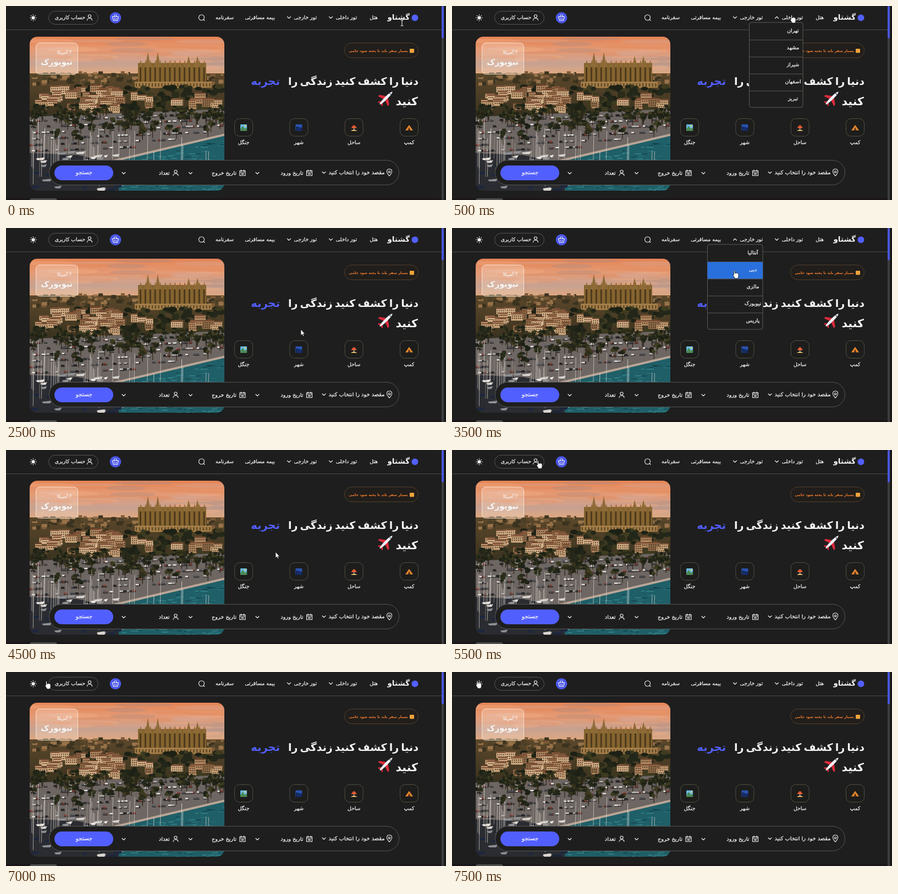
An HTML page with a canvas that plays this animation: 800 by 354 pixels, repeating every 8 s.

```html
<!DOCTYPE html>
<html lang="fa">
<head>
<meta charset="utf-8">
<title>Travel site tour</title>
<style>
  html, body { margin: 0; width: 100%; height: 100%; overflow: hidden; background: #1e1e1e; }
  #stage { position: relative; width: 800px; height: 354px; overflow: hidden; background: #1e1e1e; }
  .page, svg { position: absolute; left: 0; top: 0; width: 800px; height: 354px; }
  canvas { position: absolute; }
  text { font-family: "DejaVu Sans", sans-serif; direction: rtl; }
  .line { fill: none; stroke: #f2f2f2; stroke-width: 1.1; stroke-linecap: round; stroke-linejoin: round; }
</style>
</head>
<body>
<div id="stage">
  <div class="page" id="home"><canvas id="city"></canvas><svg id="homeArt"></svg></div>
  <div class="page" id="login"><canvas id="shore"></canvas><svg id="loginArt"></svg></div>
  <svg id="top"></svg>
</div>
<script>
const $ = id => document.getElementById(id);
const BG = '#1e1e1e', BLUE = '#525fff', WIRE = '#555';
const bold = { bold: 1 }, mid = { mid: 1 };
const repeat = (n, f) => { for (let i = 0; i < n; i++) f(i); };

// ---- SVG helpers ----
function text(x, y, s, size = 9.3, { fill = '#f6f6f6', bold, mid, gap = 0 } = {}) {
  const weight = bold ? 'font-weight="700"' : `stroke="${fill}" stroke-width=".25"`;
  return `<text x="${x}" y="${y}" font-size="${size}" fill="${fill}" ${weight} word-spacing="${gap}"` +
    ` text-anchor="${mid ? 'middle' : 'start'}">${s}</text>`;
}
const box = (x, y, w, h, r = 0, fill = 'none', stroke = 'none') =>
  `<rect x="${x}" y="${y}" width="${w}" height="${h}" rx="${r}" fill="${fill}" stroke="${stroke}"/>`;
const dot = (x, y, r, fill) => `<circle cx="${x}" cy="${y}" r="${r}" fill="${fill}"/>`;
const ring = r => `<circle class="line" r="${r}"/>`;
const shape = (d, fill) => `<path d="${d}" fill="${fill}"/>`;
const line = d => `<path class="line" d="${d}"/>`;
const at = (x, y, body, extra = '') => `<g transform="translate(${x} ${y}) ${extra}">${body}</g>`;

const chevron = (x, y, up) => at(x, y, line('M-3-1.5L0 1.5L3-1.5'), up ? 'scale(1 -1)' : '');
const person = at(0, -2.4, ring(2.6)) + line('M-4.5 5C-4.5 0 4.5 0 4.5 5');
const calendar = line('M-5-4H5V5H-5ZM-5-1.2H5M-2.5-5.5V-3M2.5-5.5V-3') + box(-2.5, .8, 5, 2.2, 0, '#ddd');
const pin = line('M0 6C-7-1-5-6.5 0-6.5S7-1 0 6Z') + at(0, -1.3, ring(1.7));
const lens = ring(5) + line('M3.6 3.6L5.5 5.5');
const basket = line('M-5.5-2H5.5L3.5 5H-3.5ZM-3-2L-1-5.5M3-2L1-5.5M-1.4 1V3M1.4 1V3');
const sun = dot(0, 0, 3, '#fff') +
  [...Array(8)].map((_, i) => `<g transform="rotate(${i * 45})">${line('M4.6 0H5.7')}</g>`).join('');

const wing = shape('M0-5L14 5V9L0 4ZM0 10L6 15V18L0 15Z', '#d92b3c');
const plane = wing + `<g transform="scale(-1 1)">${wing}</g>` +
  '<ellipse rx="2.9" ry="18" fill="#eef0f4"/>' + box(-1.7, -13, 3.4, 2, 1, '#50627a');

const tent = shape('M-7 5L0-5L7 5Z', '#e88a2c') + shape('M-2.5 5L0-1L2.5 5Z', '#5b2f1c');
const beach = shape('M-6 6Q0 1 6 6Z', '#e9c06a') + shape('M-5 1Q0-10 5 1Z', '#e2562f') + box(-.5, 0, 1, 5, 0, '#ddd');
const town = box(-6, -6, 12, 12, 1, '#2a52ae') + [0, 1, 2].map(i => box(i * 4 - 5, i - 2, 3, 8 - i, 0, '#10204f')).join('');
const park = box(-6, -6, 12, 12, 1, '#69b9e0') + shape('M-6 3L-2-3L2 2L6 0V6H-6Z', '#4a8a54') + dot(3, -3, 1.4, '#f5d75f');

// ---- Pages ----
const menus = [
  { x: 540.5, w: 97.5, title: 'تور داخلی', items: ['تهران', 'مشهد', 'شیراز', 'اصفهان', 'تبریز'] },
  { x: 464.5, w: 100.5, title: 'تور خارجی', items: ['آنتالیا', 'دبی', 'مالزی', 'نیویورک', 'پاریس'] }
];
const edge = box(0, 351, 797, 3, 0, '#1a151a') + box(797, 0, 3, 354, 0, '#181818');

function drawHome() {
  let s = edge + box(0, 43, 792, 1, 0, '#4b4b4b') + box(43, 351, 50, 8, 4, '#505050');
  s += box(792, 0, 4, 354, 0, '#3d3d3d') + box(792, 0, 4, 59, 2, '#4a55dc');

  // Header
  s += dot(743.5, 21.5, 6, BLUE) + text(734, 25, 'گشتاو', 13.5, bold);
  s += text(676, 24, 'هتل') + text(489, 24, 'بیمه مسافرتی') + text(414, 24, 'سفرنامه');
  menus.forEach(m => s += text(m.x + m.w, 24, m.title));
  s += at(355.5, 21, lens) + dot(199, 21.5, 10.3, '#4b57e8') + at(199, 21.5, basket);
  s += box(77.5, 9.5, 90, 24, 12, 'none', WIRE) + text(144, 24.3, 'حساب کاربری') + at(152, 21, person);
  s += at(49.5, 21.5, sun);

  // Photo label
  s += box(54.5, 67.5, 76, 57, 7, 'rgba(255,235,220,.27)', 'rgba(255,245,235,.75)');
  s += text(112, 87, 'آمریکا', 7.6) + at(117, 83.5, pin, 'scale(.5)') + text(121, 107, 'نیویورک', 14.4, bold);

  // Headline
  s += box(615.5, 67.5, 134, 27, 13.5, '#211e1b', '#51402f') + box(734, 78, 8, 7.5, 1, '#f0a23c');
  s += text(731, 83.5, 'بسیار سفر باید تا پخته شود خامی', 6.5, { bold: 1, fill: '#f07c30' });
  s += text(750, 143.5, 'دنیا را کشف کنید زندگی را', 19, { bold: 1, gap: -2.5 });
  s += text(498, 143.5, 'تجربه', 19.5, { bold: 1, fill: BLUE });
  s += text(749, 181, 'کنید', 20.5, bold) + at(691, 168, plane, 'rotate(45) scale(.9)');

  [['کمپ', tent], ['ساحل', beach], ['شهر', town], ['جنگل', park]].forEach(([name, icon], i) => {
    const x = 733 - i * 100.3;
    s += box(x - 16.5, 205.5, 33, 32, 9, '#1d1d1c', '#504e42') + at(x, 222, icon) + text(x, 252, name, 9.3, mid);
  });

  // Search bar
  s += box(78.5, 281.5, 636, 45, 22.5, BG, WIRE) + box(88, 291, 107, 27, 13.5, BLUE);
  s += text(142, 307, 'جستجو', 10.2, mid);
  s += at(697, 304, pin) + text(688.5, 307, 'مقصد خود را انتخاب کنید', 9.8) + chevron(578, 304);
  [['تاریخ ورود', calendar], ['تاریخ خروج', calendar], ['تعداد', person]].forEach(([name, icon], i) => {
    const x = 551.5 - i * 121.5;
    s += at(x, 304.5, icon) + text(x - 11, 308, name, 9.8) + chevron(x - 94.5, 305);
  });
  $('homeArt').innerHTML = s;
}

function drawLogin() {
  const link = { fill: '#2c2ce0' }, faint = { fill: '#77706a' };
  const pill = (y, fill = 'none') => box(466.5, y + .5, 248, 25.5, 13, fill, '#4a4a4a');
  let s = edge + text(715, 57, 'خوش آمدید', 17, bold);
  s += pill(82) + text(705, 98, 'نام کاربری', 8.3, faint);
  s += pill(122) + text(705, 138, 'رمز عبور', 8.1, faint);
  s += at(480, 135, line('M-4 0Q0-5 4 0Q0 5-4 0ZM-3.5-3.5L3.5 3.5') + dot(0, 0, 1.5, '#eee'));
  s += text(715, 173, 'رمز عبور خود را فراموش کرده اید؟', 7.5, bold) + text(588, 173, 'بازیابی رمز عبور', 7.8, link);
  s += pill(193, '#4b4b4b') + text(591, 209, 'ارسال', 8.2, { ...bold, ...mid });
  s += box(466, 240.5, 92, 1, 0, '#454545') + box(623, 240.5, 92, 1, 0, '#454545');
  s += text(591, 244, 'وارد شدن با', 8.3, { mid: 1, fill: '#626262' });
  s += pill(263) + dot(573.5, 275, 4.6, '#4285f4');
  s += `<text x="582.5" y="278.2" font-size="9" font-weight="700" fill="#fff"
    style="font-family:Roboto,sans-serif;direction:ltr">Quvola</text>`;
  s += text(644, 312, 'حساب کاربری ندارید؟', 7.7, bold) + text(562, 312, 'ثبت نام', 8, link);
  $('loginArt').innerHTML = s;
}

// ---- Photos as flat shapes ----
function painter(id, x, y, w, h, r, seed) {
  const cv = $(id), c = cv.getContext('2d');
  cv.width = w; cv.height = h;
  cv.style.cssText = `left:${x}px;top:${y}px;border-radius:${r}px`;
  c.translate(-x, -y);
  const rnd = (a, b) => a + (b - a) * (seed = seed * 16807 % 2147483647) / 2147483647;
  const pick = list => list[Math.floor(rnd(0, list.length))];
  const rect = (fill, a, b, p, q) => { c.fillStyle = fill; c.fillRect(a, b, p, q); };
  const blob = (fill, a, b, p, q) => { c.fillStyle = fill; c.beginPath(); c.ellipse(a, b, p, q, 0, 0, 7); c.fill(); };
  const poly = (fill, ...pts) => {
    c.fillStyle = fill; c.beginPath();
    for (let i = 0; i < pts.length; i += 2) c.lineTo(pts[i], pts[i + 1]);
    c.fill();
  };
  const stroke = (col, lw, a, b, p, q) => {
    c.strokeStyle = col; c.lineWidth = lw; c.beginPath(); c.moveTo(a, b); c.lineTo(p, q); c.stroke();
  };
  // Vertical gradient band over the full width
  const band = (y0, y1, ...cols) => {
    const g = c.createLinearGradient(0, y0, 0, y1);
    cols.forEach((k, i) => g.addColorStop(i / (cols.length - 1), k));
    rect(g, x, y0, w, y1 - y0);
  };
  const haze = (n, cols, y0, y1) => {
    c.globalAlpha = .35;
    repeat(n, () => blob(pick(cols), rnd(x, x + w), rnd(y0, y1), rnd(20, 60), rnd(1.5, 5)));
    c.globalAlpha = 1;
  };
  // Ragged hill rising to one peak
  const ridge = (fill, x0, x1, base, peak, top, rough = 4) => {
    const pts = [x0, base];
    for (let a = x0 + 4; a < x1; a += 4) {
      const u = a < peak ? (a - x0) / (peak - x0) : (x1 - a) / (x1 - peak);
      pts.push(a, base - (base - top) * u + rnd(-rough, rough));
    }
    poly(fill, ...pts, x1, base);
  };
  return { rnd, pick, rect, blob, poly, stroke, band, haze, ridge };
}

function drawCity() {
  const { rnd, pick, rect, blob, poly, stroke, band, haze } = painter('city', 43, 56, 354, 281, 14, 71);
  const leaf = ['#1d2115', '#2b2d1a', '#3d3b20', '#23271a'];
  band(56, 130, '#e58455', '#e49a74', '#c7a190', '#e6aa7b');
  haze(30, ['#f4ae84', '#a98a82', '#e2865a', '#d3a795'], 58, 112);

  // Old town
  band(123, 200, '#5c482b', '#3a321f');
  repeat(130, () => rect(pick(['#7d5b38', '#3b331f', '#98734a', '#4d4027']), rnd(43, 392), rnd(119, 140), rnd(3, 12), rnd(3, 8)));

  // Cathedral
  const spire = (x, top, w) => poly('#8d6a36', x - w, 112, x, top, x + w, 112);
  rect('#86642f', 240, 104, 124, 46);
  repeat(14, i => {
    spire(245 + i * 8.9, 98, 3);
    rect('#4d3a1d', 243 + i * 8.9, 112, 3, 26);
  });
  [258, 276, 332, 348].forEach((x, i) => spire(x, i < 2 ? 84 : 91, 5));
  rect('#a37d49', 234, 138, 140, 11);
  repeat(24, i => rect('#59421f', 236 + i * 5.8, 141, 2, 6));

  // Trees, then house fronts stepping down the slope
  repeat(120, () => blob(pick(leaf), rnd(130, 397), rnd(147, 190), rnd(4, 9), rnd(3, 6)));
  repeat(60, i => {
    const left = i < 44, x = left ? rnd(43, 205) : rnd(225, 385), y = left ? 143 + i * .9 : rnd(156, 172);
    const w = rnd(10, 22), h = rnd(9, 18);
    rect(pick(['#b08660', '#cba57c', '#8f6a48', '#d9b48c']), x, y, w, h);
    rect('#70442c', x, y, w, 2);
    for (let a = x + 2; a < x + w - 1; a += 3.5)
      for (let b = y + 4; b < y + h - 2; b += 4) rect('#453422', a, b, 1.6, 2.2);
  });

  // Car park in rows, with palms between
  poly('#6d6662', 43, 202, 397, 188, 397, 236, 205, 280, 43, 290);
  repeat(230, i => {
    const x = rnd(43, 390), y = 208 + (i % 6) * 11 - (x - 43) * .04;
    if (y > 262 - (x - 200) * .2) return;
    rect('#35302e', x, y + 2, 7, 2);
    rect(pick(['#e4e2df', '#202124', '#4d5056', '#b5b2b0', '#7c3a30']), x, y, rnd(4, 7), 2.6);
  });
  repeat(110, i => {
    const x = rnd(43, 397), y = i < 70 ? rnd(183, 204) : rnd(200, 246 - (x - 43) * .06);
    stroke('#33281d', 1.3, x, y, x, y + 15);
    repeat(6, () => blob(pick(leaf), x + rnd(-5, 5), y + rnd(-4, 4), rnd(2, 4.5), rnd(1.5, 3.5)));
  });

  // Harbour
  poly('#1f5f68', 397, 236, 397, 337, 43, 337, 43, 290, 205, 282);
  repeat(160, () => {
    const x = rnd(205, 397);
    rect(pick(['#3b8a90', '#123f49', '#2b767d']), x, rnd(290 - (x - 195) * .24, 337), rnd(4, 14), 1.3);
  });
  stroke('#b9a596', 4, 190, 284, 397, 235);
  poly('#2a2c31', 43, 268, 130, 272, 205, 288, 205, 337, 43, 337);
  repeat(60, () => {
    const x = rnd(43, 205), y = rnd(266, 335), w = rnd(8, 20);
    poly(pick(['#d8d4d0', '#8c8f94', '#1c2640', '#efe9e4']), x, y, x + w, y - 2, x + w - 3, y + 3, x + 3, y + 3);
  });
  repeat(44, i => {
    const x = i < 34 ? rnd(43, 205) : rnd(205, 395), y = rnd(275, 330);
    stroke(pick(['#d8d0c8', '#9c948c', '#f3eeea']), .7, x, y, x + 1, y - rnd(30, 75));
  });
}

function drawShore() {
  const { rnd, pick, rect, blob, poly, band, haze, ridge } = painter('shore', 19, 18, 381, 319, 20, 29);
  band(18, 160, '#227f89', '#4d8b91', '#a3a29c', '#d8b294', '#e5bd97');
  haze(34, ['#e2bda0', '#8b8684', '#c9a995', '#77898d'], 48, 105);
  blob('#cfa890', 48, 32, 32, 14);
  band(158, 337, '#778da3', '#b4bcc8', '#d2ced0', '#8fa9b5', '#3f7d88');
  haze(55, ['#e5dfdf', '#7e9bae', '#c9d0d9'], 163, 285);

  // Sea stacks with lit faces
  ridge('#6b5038', 38, 92, 160, 69, 99);
  ridge('#54432f', 38, 181, 160, 131, 64);
  ridge('#8b6b3f', 108, 152, 122, 131, 70);
  ridge('#a56c5a', 80, 124, 155, 102, 108);
  ridge('#372f2a', 118, 180, 160, 152, 122);
  ridge('#55463a', 247, 272, 160, 257, 137, 2);
  ridge('#55463a', 264, 300, 160, 279, 96, 2);
  ridge('#a0775a', 270, 286, 152, 278, 104, 2);

  // Rocks grow towards the viewer
  const rock = (x, y, w) => {
    ridge('#1f2327', x - w, x + w, y, x - w * .3, y - w * .8, w * .08);
    blob('#1f2327', x, y - w * .25, w * .9, w * .34);
    repeat(6, () => rect('#3b4349', x + rnd(-.5, .4) * w, y - rnd(.1, .5) * w, w * .2, 1.2));
  };
  [[145, 184, 32], [82, 211, 44], [145, 252, 34], [245, 200, 36], [270, 222, 37], [191, 234, 21], [372, 223, 22]]
    .forEach(r => rock(...r));
  repeat(9, i => {
    const y = 175 + i * 9;
    blob('#23282d', rnd(40, 395), y, y / 14, y / 70);
  });

  // Pebble beach
  poly('#16242a', 19, 248, 135, 264, 245, 284, 310, 304, 400, 313, 400, 337, 19, 337);
  repeat(900, () => {
    const x = rnd(19, 330);
    rect(pick(['#0f1416', '#2b3c44', '#295962', '#121b20']), x, rnd(252 + (x - 19) * .16, 337), rnd(1, 3.5), 1.4);
  });
  blob('#15191c', 360, 322, 55, 38);
  repeat(60, () => rect('#30383d', rnd(315, 395), rnd(292, 335), rnd(2, 6), 1));
}

// ---- Pointer and menus ----
const hand = 'M-3.5-5.5Q-2.5-7-1.5-5.5V-1.5Q5-3 5 1V3.5Q5 6 3.5 8H-1.5L-5.5 1.5L-3.5 1.2Z';
const arrow = 'M0-4V7L2.5 4.8L4.2 8.4L6 7.6L4.3 4.2H7.5Z';
const solid = d => `<path d="${d}" fill="#fff" stroke="#111" stroke-width=".8"/>`;
const beam = line('M-2-5H2M0-5V5M-2 5H2');

const ROW = 31, TOP = 30;
function menuArt(m, row) {
  const grey = '#5a5a55', center = m.x + m.w - 18;
  let s = box(m.x, TOP, m.w, ROW * 5, 4, BG, grey);
  m.items.forEach((name, i) => {
    const y = TOP + i * ROW;
    if (i) s += box(m.x, y + .5, m.w, 1, 0, grey);
    if (i === row) s += box(m.x, y + 1, m.w, ROW, 0, '#2a70dc');
    s += text(center, y + 18, name, 9.3, mid);
  });
  return s;
}

// Pointer path: step, x, y. What it hovers decides the rest.
const path = [[0, 720, 31], [1, 620, 23], [3, 604, 106], [5, 536, 189], [6, 540, 23],
  [7, 516, 84], [9, 490, 190], [11, 159, 26], [15, 48.5, 22]];
const STEP = 500, COUNT = 16;
const onLogin = i => i === 12 || i === 13;

function pointerAt(i) {
  const k = Math.max(1, path.findIndex(p => p[0] >= i));
  const [t0, x0, y0] = path[k - 1], [t1, x1, y1] = path[k];
  const u = (i - t0) / (t1 - t0);
  return [x0 + (x1 - x0) * u, y0 + (y1 - y0) * u];
}

function show(i) {
  const login = onLogin(i);
  $('home').style.display = login ? 'none' : '';
  $('login').style.display = login ? '' : 'none';
  if (login) { $('top').innerHTML = ''; return; }
  const [x, y] = pointerAt(i);
  const open = menus.find(m => x > m.x && x < m.x + m.w && y < TOP + ROW * 5);
  let s = menus.map(m => chevron(m.x + 50, 21, m === open)).join('');
  if (open) s += menuArt(open, Math.floor((y - TOP) / ROW));
  const pointer = x > 695 ? beam : solid(open || y < 35 ? hand : arrow);
  $('top').innerHTML = s + at(x, y, pointer);
}

drawHome();
drawLogin();
drawCity();
drawShore();

let last = -1;
function tick() {
  const i = Math.floor(performance.now() / STEP) % COUNT;
  if (i !== last) show(last = i);
  requestAnimationFrame(tick);
}
tick();
</script>
</body>
</html>
```
